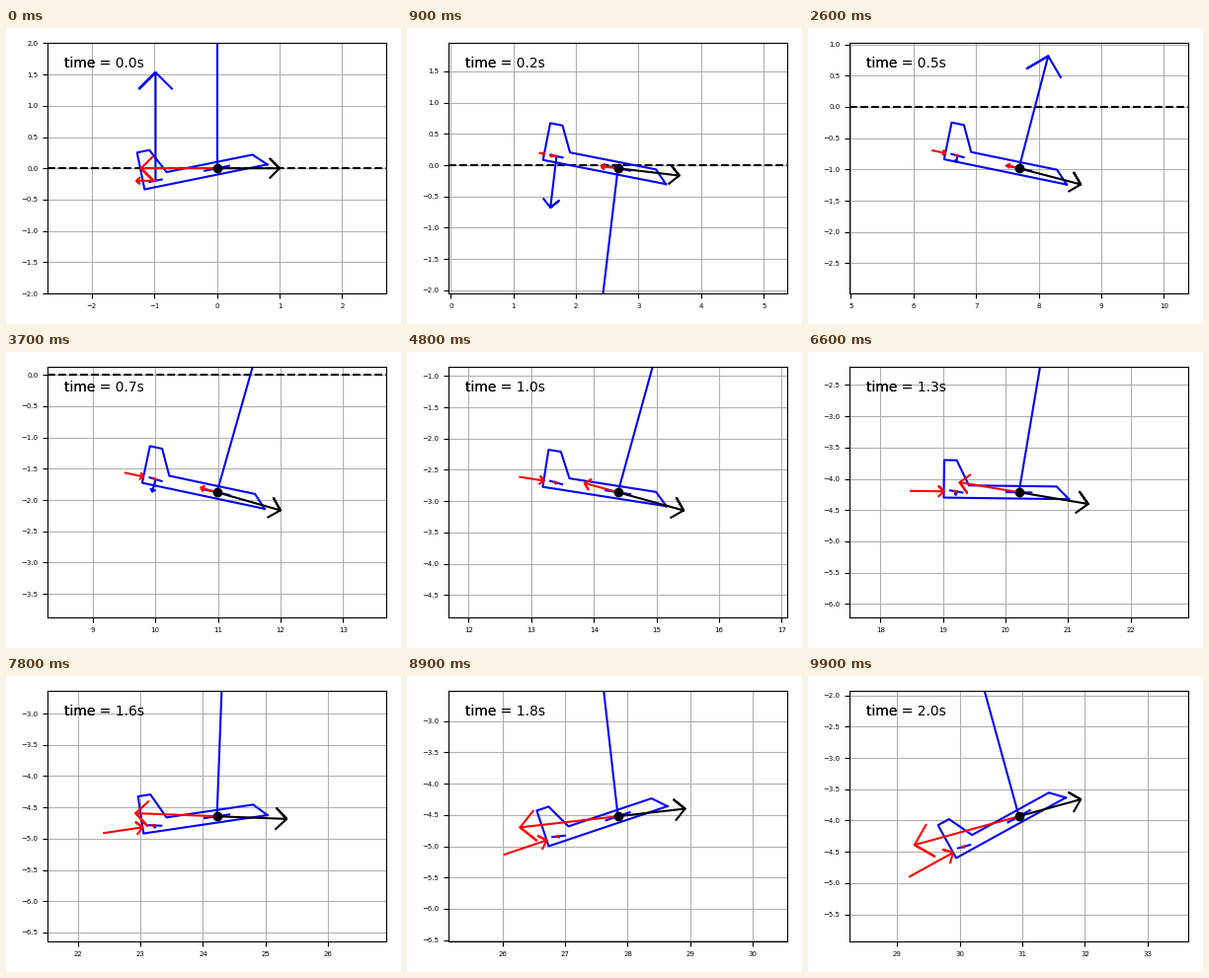
Recreate the animation shown at these times as a matplotlib script. Size 400 px wide and 300 px high, loop 10 s.

```python
import numpy as np
import matplotlib.pyplot as plt
from matplotlib.animation import FuncAnimation

FRAMES, DT, SUBSTEPS = 100, 0.02, 8
RHO, G, MASS, INERTIA = 1.225, 9.81, 1.0, 0.05
WING, TAIL = 0.1, 0.025          # areas
ARM = 1.0                        # tail distance behind the centre of gravity
FORCE, SPEED = 0.4, 1 / 15       # arrow length per newton and per m/s

BODY = np.array([[0.8, 0.6, -0.8, -1.0, -1.2, -1.2, 0.8],
                 [-0.1, 0.1, 0.1, 0.5, 0.5, -0.1, -0.1]])
ARROW = np.array([[0, 1, 0.85, 1, 0.85],
                  [0, 0, 0.15, 0, -0.15]])


def elevator(t):
    return -0.12 * t


def thrust(t):
    return t


def aero(area, alpha, speed):
    q = 0.5 * RHO * speed ** 2 * area
    return q * 2 * np.pi * alpha, q * (0.02 + 5 * alpha ** 2)


def loads(t, s):
    """Flight path angle, speed, then lift and drag of wing and tail."""
    _, _, theta, vx, vy, _ = s
    gamma, speed = np.arctan2(vy, vx), np.hypot(vx, vy)
    alpha = theta - gamma
    return (gamma, speed, *aero(WING, alpha, speed),
            *aero(TAIL, alpha + elevator(t), speed))


def deriv(t, s):
    theta, vx, vy, rate = s[2:]
    gamma, _, lift, drag, tail_lift, tail_drag = loads(t, s)
    up, back, push = lift + tail_lift, drag + tail_drag, thrust(t)
    c, n = np.cos(gamma), np.sin(gamma)
    acc_x = (-up * n - back * c + push * np.cos(theta)) / MASS
    acc_y = (up * c - back * n + push * np.sin(theta)) / MASS - G
    alpha = theta - gamma
    normal = tail_lift * np.cos(alpha) + tail_drag * np.sin(alpha)
    return np.array([vx, vy, rate, acc_x, acc_y, -normal * ARM / INERTIA])


def simulate():
    """Euler steps from level flight at 15 m/s, nose raised."""
    s, h = np.array([0, 0, 0.2, 15.0, 0, 0]), DT / SUBSTEPS
    states = []
    for i in range(FRAMES * SUBSTEPS):
        if i % SUBSTEPS == 0:
            states.append(s)
        s = s + h * deriv(i * h, s)
    return states


def place(points, angle, origin):
    c, n = np.cos(angle), np.sin(angle)
    return np.array([[c, -n], [n, c]]) @ points + np.reshape(origin, (2, 1))


states = simulate()

W, H = 343.2, 253.6
fig = plt.figure(figsize=(4, 3), dpi=100)
ax = fig.add_axes([42 / 400, 31 / 300, W / 400, H / 300])
ax.tick_params(labelsize=5)
ax.grid(True)
ax.axhline(0, color="k", ls="--")
ax.text(0.05, 0.904, "time = ", transform=ax.transAxes)
clock = ax.text(0.05, 0.904, "", transform=ax.transAxes)


def line(style):
    return ax.plot([], [], style)[0]


body, wing, flap = line("b-"), line("b-"), line("b-")
wing_lift, tail_lift = line("b-"), line("b-")
wing_drag, tail_drag, jet = line("r-"), line("r-"), line("r-")
velocity, centre = line("k-"), line("ko")


def update(i):
    t, s = i * DT, states[i]
    pos, theta = s[:2], s[2]
    gamma, speed, lw, dw, lt, dt = loads(t, s)
    tail = place(np.array([[-ARM], [0]]), theta, pos)
    push = FORCE * thrust(t)
    nozzle = place(np.array([[-1.2 - push], [0]]), theta, pos)

    body.set_data(*place(BODY, theta, pos))
    wing.set_data(*place(np.array([[-0.2, 0.2], [0, 0]]), theta, pos))
    flap.set_data(*place(np.array([[-0.1, 0.1], [0, 0]]),
                         theta + elevator(t), tail))
    up, back = gamma + np.pi / 2, gamma + np.pi
    for art, size, angle, origin in (
            (wing_lift, FORCE * lw, up, pos), (tail_lift, FORCE * lt, up, tail),
            (wing_drag, FORCE * dw, back, pos), (tail_drag, FORCE * dt, back, tail),
            (jet, push, theta, nozzle), (velocity, SPEED * speed, gamma, pos)):
        art.set_data(*place(ARROW * size, angle, origin))
    centre.set_data([pos[0]], [pos[1]])

    clock.set_text(f"time = {t:.1f}s")
    ax.set_xlim(pos[0] - 2 * W / H, pos[0] + 2 * W / H)
    ax.set_ylim(pos[1] - 2, pos[1] + 2)


anim = FuncAnimation(fig, update, frames=FRAMES, init_func=lambda: update(0),
                     interval=100, repeat=True, repeat_delay=0, blit=False)
plt.show()
```
